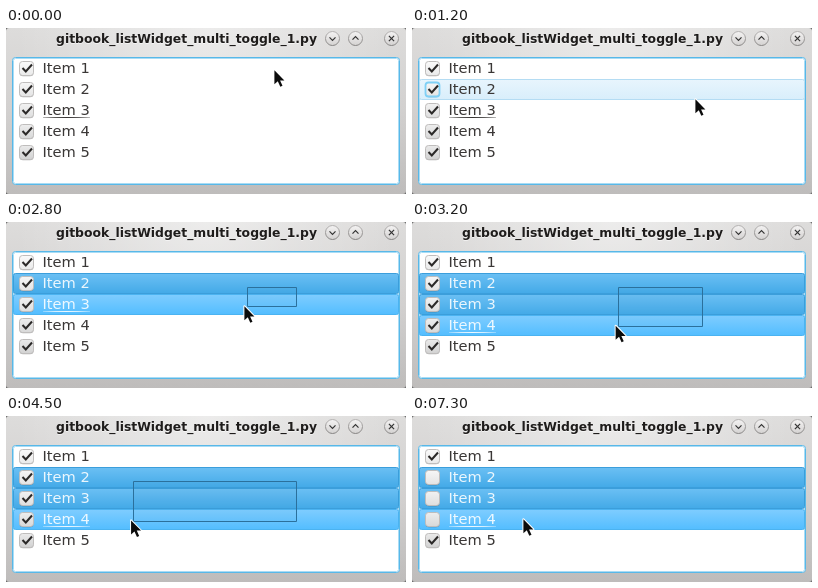
Recreate the animation shown at these times as an HTML page with a canvas. Size 400 by 166 pixels, loop 8000 ms.

```html
<!DOCTYPE html>
<html lang="en">
<head>
<meta charset="utf-8">
<title>List widget multi toggle</title>
<style>
html, body { margin: 0; width: 100%; height: 100%; overflow: hidden; background: #d2d0cf; }
canvas { display: block; width: 400px; height: 166px; }
</style>
</head>
<body>
<canvas id="stage"></canvas>
<script>
const LOOP = 8000, STEP = 100, W = 400, H = 166;
const ROW_TOP = 30, ROW_H = 21, ROWS = 5;
const PRESS_AT = 1800, DRAG_AT = 2100, RELEASE_AT = 5500, TOGGLE_AT = 7300;
const PRESS = { x: 290.5, y: 65.5 };
const canvas = document.getElementById('stage');
const ctx = canvas.getContext('2d');
const ratio = window.devicePixelRatio || 1;
canvas.width = W * ratio;
canvas.height = H * ratio;

// Key points of the pointer tip: time, x, y
const path = [
  [0, 268, 42], [100, 274, 76], [400, 274, 76], [700, 278, 84], [1200, 283, 71],
  [1700, 291, 65], [2000, 291, 65], [2300, 272, 72], [2800, 238, 84],
  [3000, 217, 103], [3800, 162, 105], [4700, 114, 104], [6500, 114, 104], [6800, 111, 103]
];

function pointerAt(t) {
  const i = path.findIndex(p => p[0] > t);
  const [t1, x1, y1] = path.at(i);
  if (i < 1) return { x: x1, y: y1 };
  const [t0, x0, y0] = path[i - 1];
  const k = (t - t0) / (t1 - t0);
  return { x: x0 + (x1 - x0) * k, y: y0 + (y1 - y0) * k };
}

const rowAt = y => Math.floor((y - ROW_TOP) / ROW_H);
const rowY = i => ROW_TOP + i * ROW_H;
const gray = v => `rgb(${v},${v},${v})`;

function vertical(y0, y1, ...colors) {
  const g = ctx.createLinearGradient(0, y0, 0, y1);
  colors.forEach((c, i) => g.addColorStop(i / (colors.length - 1), c));
  return g;
}

function box(x, y, w, h, r, fill, stroke, width = 1) {
  ctx.beginPath();
  ctx.roundRect(x, y, w, h, r);
  if (fill) { ctx.fillStyle = fill; ctx.fill(); }
  if (stroke) { ctx.strokeStyle = stroke; ctx.lineWidth = width; ctx.stroke(); }
}

function line(points, color, width) {
  ctx.beginPath();
  points.forEach(([x, y]) => ctx.lineTo(x, y));
  ctx.strokeStyle = color;
  ctx.lineWidth = width;
  ctx.stroke();
}

function titleButton(x, ...strokes) {
  const y = 10.5, r = 7;
  box(x - r, y - r, 2 * r, 2 * r, r, vertical(y - r, y + r, '#f4f3f3', '#d4d2d1'),
    vertical(y - r, y + r, '#b4b2b1', '#858382'));
  for (const s of strokes) line(s.map(([dx, dy]) => [x + dx, y + dy]), '#333', 1.2);
}

function drawWindow() {
  ctx.fillStyle = '#666';
  ctx.fillRect(0, 0, W, H);
  box(0, 0, W, H, 3, vertical(0, H, '#dddcdb', '#d2d0cf', '#bebcbb'));
  const glow = ctx.createRadialGradient(W / 2, 0, 0, W / 2, 0, 190);
  glow.addColorStop(0, 'rgba(255,255,255,.45)');
  glow.addColorStop(1, 'rgba(255,255,255,0)');
  ctx.fillStyle = glow;
  ctx.fillRect(3, 0, W - 6, 60);

  const title = 'gitbook_listWidget_multi_toggle_1.py';
  ctx.font = 'bold 12.4px "DejaVu Sans", sans-serif';
  ctx.textAlign = 'center';
  ctx.fillStyle = 'rgba(255,255,255,.6)';
  ctx.fillText(title, 180.5, 16);
  ctx.fillStyle = '#1e1c1b';
  ctx.fillText(title, 180.5, 15);

  titleButton(326.5, [[-3, -1.2], [0, 1.8], [3, -1.2]]);
  titleButton(349.5, [[-3, 1.2], [0, -1.8], [3, 1.2]]);
  titleButton(385.5, [[-2.6, -2.6], [2.6, 2.6]], [[2.6, -2.6], [-2.6, 2.6]]);

  box(6.5, 29.5, 387, 127, 3, '#fff', '#58b8e8');
  box(7.5, 30.5, 385, 125, 2, null, '#a9dcf5');
}

function drawRow(i, selected, hovered) {
  if (!selected && !hovered) return;
  const y = rowY(i);
  const tones = !selected ? ['#e8f5fd', '#d8eefb']
    : hovered ? ['#80cdff', '#52bdff'] : ['#6cc0f4', '#42a9e7'];
  const edge = !selected ? '#b4dcf3' : hovered ? '#4bb3f1' : '#3b9edb';
  box(7.5, y + .5, 385, ROW_H - 1, 2, vertical(y, y + ROW_H, ...tones), edge);
}

function drawCheck(i, checked, hovered) {
  const x = 13.5, y = rowY(i) + 3.5;
  box(x, y + .8, 14, 14, 3.5, 'rgba(0,0,0,.3)');
  box(x, y, 14, 14, 3, vertical(y, y + 14, gray(250 - i * 4), gray(234 - i * 6)),
    hovered ? '#7fd0f6' : '#bfbdbc', hovered ? 1.8 : 1);
  if (checked) line([[x + 3, y + 6.5], [x + 6.3, y + 10], [x + 12.5, y + 3]], '#2b2928', 2);
}

function drawItem(i, selected, focused) {
  const y = rowY(i);
  ctx.font = '14.67px "DejaVu Sans", sans-serif';
  ctx.textAlign = 'left';
  ctx.fillStyle = selected ? 'rgba(255,255,255,.88)' : '#3a3736';
  ctx.fillText('Item ' + (i + 1), 36.5, y + 15);
  if (!focused) return;
  const rgb = selected ? '255,255,255' : '31,28,27';
  const g = ctx.createLinearGradient(37, 0, 84, 0);
  for (let k = 0; k <= 4; k++) g.addColorStop(k / 4, `rgba(${rgb},${.3 + .6 * Math.sin(k * Math.PI / 4)})`);
  ctx.fillStyle = g;
  ctx.fillRect(37, y + 17, 47, 1);
}

function drawBand({ x, y }) {
  const left = Math.min(Math.round(x) + .5, PRESS.x);
  const bottom = Math.max(Math.round(y) + .5, PRESS.y);
  box(left, PRESS.y, PRESS.x - left, bottom - PRESS.y, 0, 'rgba(30,90,130,.03)', '#2b709c');
}

function drawPointer({ x, y }) {
  const shape = [[0, 0], [0, 14], [3.4, 11], [5.9, 16.6], [8.1, 15.6], [5.7, 10.2], [10, 10.2]];
  ctx.beginPath();
  shape.forEach(([dx, dy]) => ctx.lineTo(x + dx + .4, y + dy + .2));
  ctx.closePath();
  ctx.lineJoin = 'round';
  ctx.strokeStyle = '#fff';
  ctx.lineWidth = 2;
  ctx.stroke();
  ctx.fillStyle = '#0c0c0c';
  ctx.fill();
  ctx.lineJoin = 'miter';
}

function draw(t) {
  const tip = pointerAt(t);
  const corner = pointerAt(t - 40);   // the band trails the pointer
  corner.y += 1;
  const last = t < PRESS_AT ? 0 : rowAt(corner.y - 2);
  const hover = t < STEP ? -1 : last || rowAt(tip.y);
  const focus = last || 2;
  ctx.setTransform(ratio, 0, 0, ratio, 0, 0);
  drawWindow();
  for (let i = 0; i < ROWS; i++) {
    const selected = i >= 1 && i <= last;
    drawRow(i, selected, i === hover);
    drawCheck(i, !(selected && t >= TOGGLE_AT), i === hover && !selected);
    drawItem(i, selected, i === focus);
  }
  if (t >= DRAG_AT && t < RELEASE_AT) drawBand(corner);
  drawPointer(tip);
}

const start = performance.now();
function tick() {
  const t = (performance.now() - start) % LOOP;
  draw(Math.floor(t / STEP) * STEP);
  requestAnimationFrame(tick);
}
tick();
</script>
</body>
</html>
```
